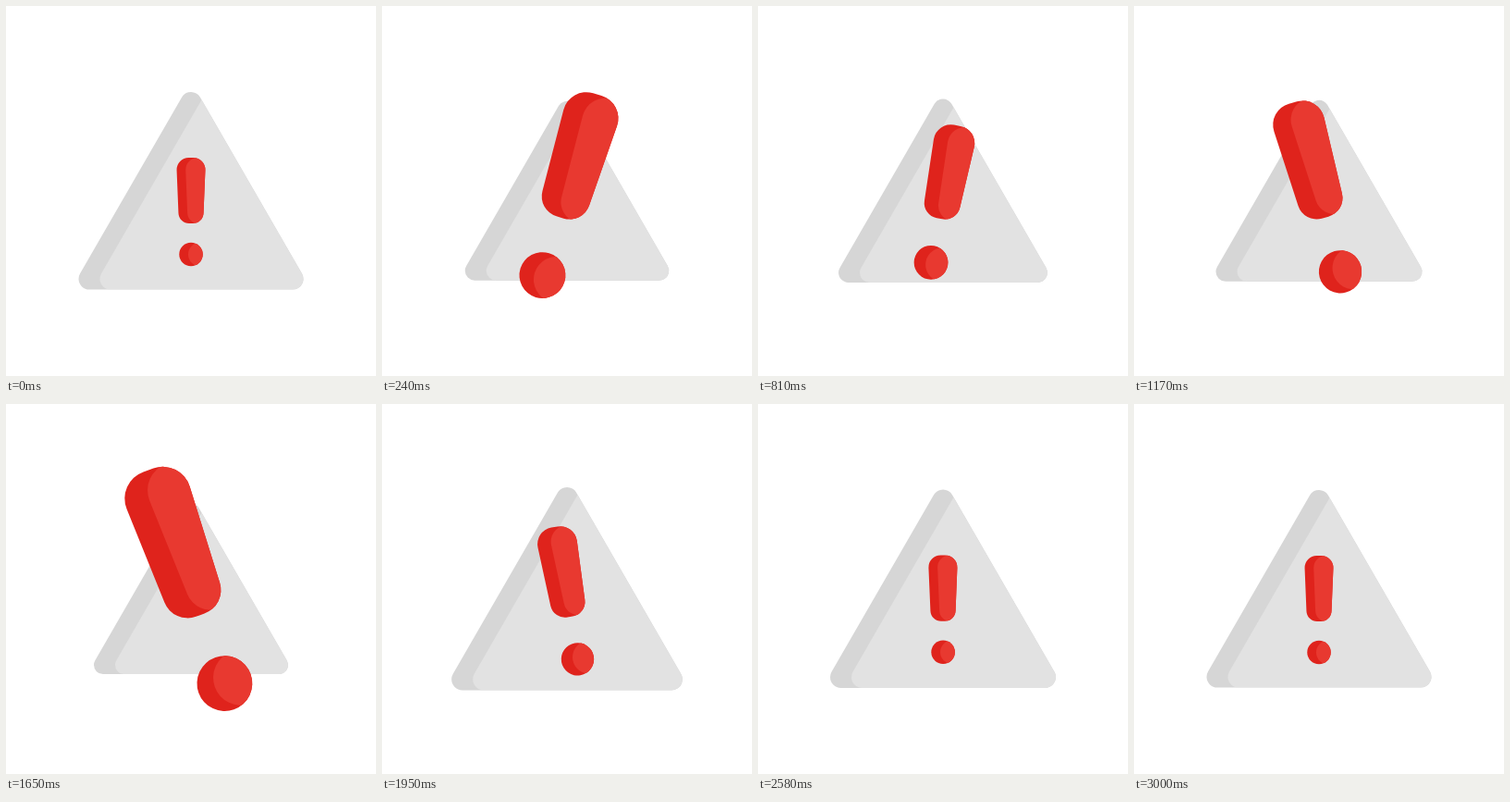
Recreate the animation shown at these times as an HTML page with a canvas. Size 400x400 px, loop 5030 ms.

```html
<!DOCTYPE html>
<html lang="en">
<head>
<meta charset="utf-8">
<title>Warning sign</title>
<style>
  html, body { margin: 0; width: 100%; height: 100%; overflow: hidden; background: #fff; }
  canvas { display: block; }
</style>
</head>
<body>
<canvas id="stage" width="400" height="400"></canvas>
<script>
const ctx = document.getElementById('stage').getContext('2d');
const LOOP = 5030, MOVE = 3000, STEP = 30, CENTER = 200;
const GREYS = ['#d6d6d6', '#e2e2e2'], REDS = ['#df231c', '#e83930'];

// Turning points as [ms, value]; lean is 1 at full right tilt, -1 at full left tilt
const SIGN_SCALE = [[0, 1], [400, .857], [940, .942], [1590, .857], [2190, 1.12], [2700, .985], [MOVE, 1]];
const LEAN = [[0, 0], [380, 1], [1490, -1], [1580, -1], [2200, .1], [2700, -.02], [MOVE, 0]];
const UPRIGHT_AT = 935;

const REST_Y = 222.5, FULL_SCALE = 2.4, FULL_TILT = Math.PI / 9;

const mix = (from, to, u) => from + (to - from) * u;

function eased(keys, t) {
  const next = Math.max(1, keys.findIndex(([time]) => time >= t));
  const [t0, v0] = keys[next - 1], [t1, v1] = keys[next];
  const u = (t - t0) / (t1 - t0);
  return mix(v0, v1, u * u * (3 - 2 * u));
}

// Symmetric shape with rounded corners: a top edge, then a bottom edge
function roundedShape(top, bottom) {
  const path = new Path2D();
  path.moveTo(0, bottom.y);
  path.arcTo(-bottom.half, bottom.y, -top.half, top.y, bottom.r);
  path.arcTo(-top.half, top.y, 0, top.y, top.r);
  path.arcTo(top.half, top.y, bottom.half, bottom.y, top.r);
  path.arcTo(bottom.half, bottom.y, 0, bottom.y, bottom.r);
  path.closePath();
  return path;
}

// Equilateral triangle whose rounded corners are circles of radius r
function roundedTriangle(halfBase, baseY, r) {
  const path = new Path2D();
  const corners = [[-halfBase, baseY], [0, baseY - halfBase * Math.sqrt(3)], [halfBase, baseY]];
  corners.forEach(([x, y], i) => {
    const middle = Math.PI * (5 / 6 + i * 2 / 3);
    path.arc(x, y, r, middle - Math.PI / 3, middle + Math.PI / 3);
  });
  path.closePath();
  return path;
}

const sign = roundedTriangle(110, 95, 11.5);
const bar = roundedShape({ y: -58.5, half: 16, r: 13 }, { y: 12.5, half: 13.1, r: 11.5 });
const dot = new Path2D();
dot.arc(0, 46, 12.75, 0, 2 * Math.PI);

// Dark shape with a light copy of itself, shifted right and clipped to it
function shaded(path, shift, [dark, light]) {
  ctx.save();
  ctx.fillStyle = dark;
  ctx.fill(path);
  ctx.clip(path);
  ctx.translate(shift, 0);
  ctx.fillStyle = light;
  ctx.fill(path);
  ctx.restore();
}

function drawSign(scale) {
  ctx.save();
  ctx.translate(CENTER, CENTER);
  ctx.scale(scale, scale);
  shaded(sign, 23 / scale, GREYS);
  ctx.restore();
}

// Blends the upright mark with its big tilted pose; a negative amount overshoots
function drawMark(side, amount) {
  const along = mix(1, FULL_SCALE * Math.cos(FULL_TILT), amount);
  const across = mix(0, FULL_SCALE * Math.sin(FULL_TILT), amount) * side;
  const scale = Math.hypot(along, across);
  const sway = -8 * side * amount * (1 - amount);
  const lift = Math.max(amount, 0) ** .7;
  ctx.save();
  ctx.transform(along, across, -across, along, CENTER + sway / 4, mix(REST_Y, CENTER, lift));
  shaded(bar, mix(9.7, 27, amount) / scale, REDS);
  shaded(dot, mix(9.7, 19, amount) / scale, REDS);
  ctx.restore();
}

function render(t) {
  const side = t < UPRIGHT_AT ? 1 : -1;
  ctx.fillStyle = '#fff';
  ctx.fillRect(0, 0, 400, 400);
  drawSign(eased(SIGN_SCALE, t));
  drawMark(side, side * eased(LEAN, t));
}

const start = performance.now();
function tick() {
  const t = Math.min((performance.now() - start) % LOOP, MOVE);
  render(Math.floor(t / STEP) * STEP);
  requestAnimationFrame(tick);
}
tick();
</script>
</body>
</html>
```
